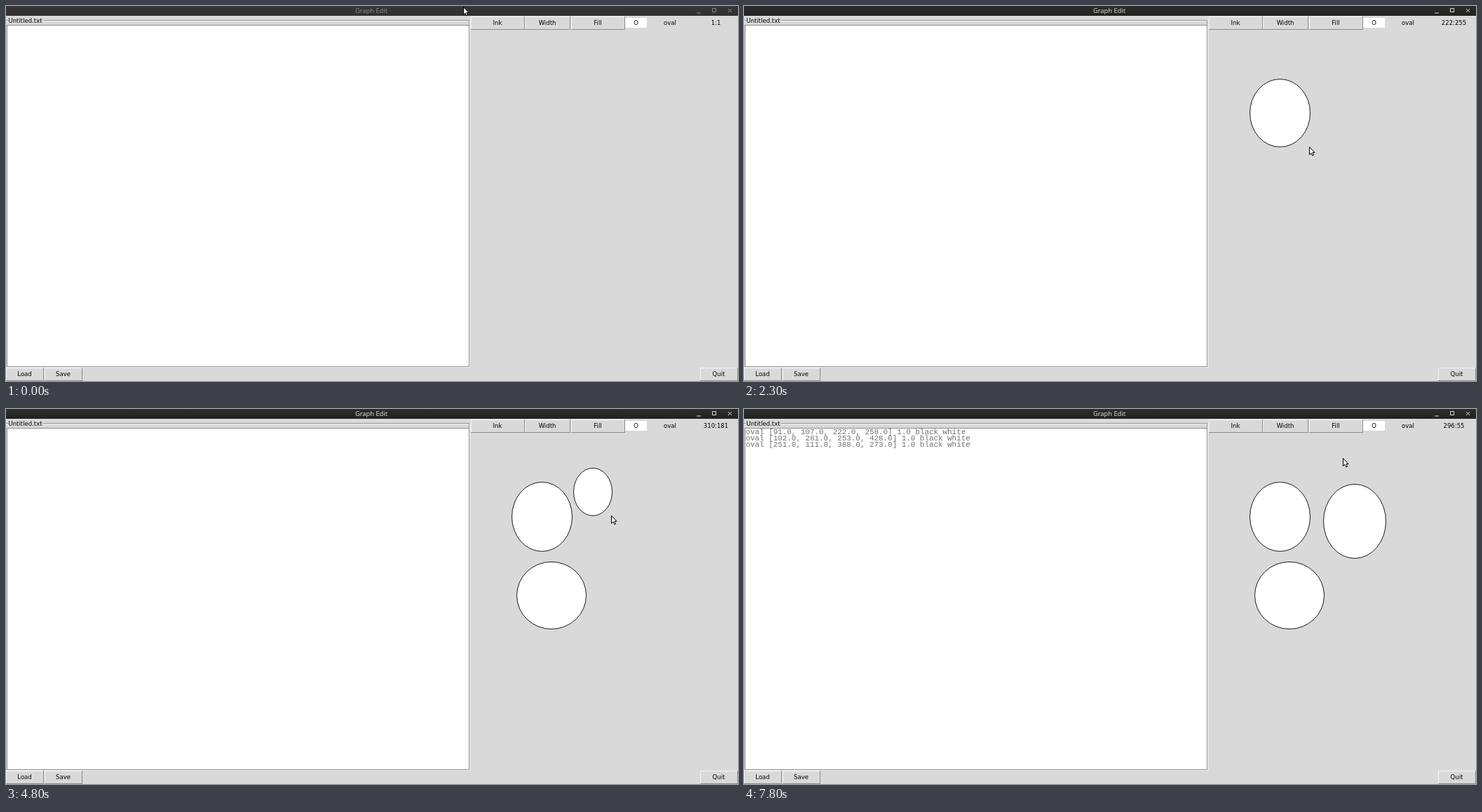
Write an HTML page with a canvas that moves like this. It is 1044 px wide and 536 px high and loops after 8 s.

```html
<!DOCTYPE html>
<html lang="en">
<head>
<meta charset="utf-8">
<title>Graph Edit</title>
<style>
html, body { margin: 0; width: 100%; height: 100%; overflow: hidden; background: #d9d9d9; }
canvas { display: block; }
</style>
</head>
<body>
<canvas id="stage" width="1044" height="536"></canvas>
<script>
const ctx = document.getElementById('stage').getContext('2d');
const LOOP = 8000, FOCUS = 1500, DROP = 5900, SAVED = 7600;
const UI = '8.5px "DejaVu Sans", sans-serif';
const TITLE = '9.3px "Noto Sans", "Open Sans", sans-serif';
const MONO = '10.9px "Liberation Mono", monospace';
const ARROW = new Path2D('M0 0V11L2.5 8.7L4.2 12.4L6 11.6L4.4 8H7.5Z');

// Drawing units to the centre of a stage pixel
const sx = x => Math.floor(662 + x * 0.6545) + 0.5;
const sy = y => Math.floor(34.5 + y * 0.6545) + 0.5;

// Each oval follows the pointer from press to release
const OVALS = [
  { box: [91, 107, 222, 258], press: 1500, release: 2400 },
  { box: [102, 281, 253, 428], press: 3000, release: 3900 },
  { box: [226, 77, 363, 239], press: 4400, release: 5100, shift: [25, 34] }
];

// Turning points of the pointer: time, x, y
const PATH = [
  [400, -13, -50], [1300, 98, 140], [1500, 91, 107], [1900, 165, 191],
  [2300, 222, 255], [2500, 150, 271], [2800, 102, 281], [3000, 104, 280],
  [3600, 250, 422], [4200, 222, 98], [4400, 226, 77], [4800, 310, 181],
  [5100, 363, 239], [5600, 297, 179], [5900, 322, 213], [6200, 308, 59],
  [6700, 296, 55], [LOOP, 296, 55]
];

function pointerAt(t) {
  const i = PATH.findIndex(p => p[0] > t);
  if (i < 1) return PATH[0].slice(1);
  const [t0, ...from] = PATH[i - 1], [t1, ...to] = PATH[i];
  const step = t < 2500 ? 100 : 300;
  const k = Math.floor((t - t0) / step) * step / (t1 - t0);
  return from.map((a, n) => Math.round(a + (to[n] - a) * k));
}

function boxAt({ box, press, release, shift }, t, pointer) {
  if (t < press) return null;
  if (t < release) return [box[0], box[1], ...pointer];
  return shift && t >= DROP ? box.map((v, n) => v + shift[n % 2]) : box;
}

function rect(x, y, w, h, color) {
  ctx.fillStyle = color;
  ctx.fillRect(x, y, w, h);
}

function text(str, x, y, font = UI, color = '#000', align = 'center') {
  ctx.font = font;
  ctx.fillStyle = color;
  ctx.textAlign = align;
  ctx.fillText(str, x, y);
}

function button(label, x, y, w) {
  rect(x, y, w, 19, '#8c8c8c');
  rect(x, y, w - 1, 18, '#f4f4f4');
  rect(x + 1, y + 1, w - 2, 17, '#d9d9d9');
  text(label, x + w / 2 - 0.5, y + 12);
}

function titleBar(focused) {
  const shade = ctx.createLinearGradient(0, 0, 0, 14);
  shade.addColorStop(0, focused ? '#2d2d2d' : '#373737');
  shade.addColorStop(1, focused ? '#212121' : '#303030');
  rect(0, 0, 1044, 14, shade);
  const ink = focused ? '#dfdbd2' : '#8a8a8a';
  text('Graph Edit', 521, 10.3, TITLE, ink);
  ctx.strokeStyle = ink;
  ctx.lineWidth = 1;
  ctx.beginPath();
  ctx.moveTo(985, 10); ctx.lineTo(991, 10);
  ctx.rect(1007.5, 3.5, 5, 5);
  ctx.moveTo(1030, 4); ctx.lineTo(1035, 9);
  ctx.moveTo(1035, 4); ctx.lineTo(1030, 9);
  ctx.stroke();
}

function chrome() {
  rect(0, 14, 1044, 522, '#d9d9d9');
  rect(0, 20, 661, 1, '#929292');
  rect(0, 21, 661, 1, '#f4f4f4');
  rect(3, 18, 50, 6, '#d9d9d9');
  text('Untitled.txt', 3.5, 23.5, UI, '#000', 'left');
  rect(660, 20, 1, 8, '#929292');
  rect(1, 27, 660, 489, '#8c8c8c');
  rect(2, 28, 658, 487, '#fff');
  rect(661, 20, 1, 497, '#f4f4f4');
  rect(0, 516, 662, 1, '#f4f4f4');
  button('Ink', 663, 15, 77);
  button('Width', 740, 15, 65);
  button('Fill', 806, 15, 77);
  rect(883, 17, 31, 14, '#fff');
  text('O', 898.5, 27);
  text('oval', 947, 27);
  button('Load', 0, 517, 54);
  button('Save', 55, 517, 54);
  button('Quit', 990, 517, 54);
}

function oval([x0, y0, x1, y1]) {
  if (x1 <= x0 || y1 <= y0) return;
  const l = sx(x0), t = sy(y0), r = sx(x1), b = sy(y1);
  ctx.beginPath();
  ctx.ellipse((l + r) / 2, (t + b) / 2, (r - l) / 2, (b - t) / 2, 0, 0, 2 * Math.PI);
  ctx.fillStyle = '#fff';
  ctx.fill();
  ctx.strokeStyle = '#000';
  ctx.lineWidth = 0.9;
  ctx.stroke();
}

function arrow(x, y) {
  ctx.save();
  ctx.translate(x, y);
  ctx.fillStyle = '#f2f2f2';
  ctx.strokeStyle = '#000';
  ctx.lineWidth = 1;
  ctx.fill(ARROW);
  ctx.stroke(ARROW);
  ctx.restore();
}

function fileLine(box, row) {
  const coords = box.map(v => v.toFixed(1)).join(', ');
  text(`oval [${coords}] 1.0 black white`, 2.5, 36 + row * 9, MONO, '#707070', 'left');
}

function draw(t) {
  const pointer = pointerAt(t);
  const boxes = OVALS.map(o => boxAt(o, t, pointer)).filter(Boolean);
  chrome();
  titleBar(t >= FOCUS);
  text(pointer.map(v => Math.max(1, v)).join(':'), 1012.5, 27);
  boxes.forEach(oval);
  if (t >= SAVED) boxes.forEach(fileLine);
  arrow(sx(pointer[0]) - 1, sy(pointer[1]));
}

const start = performance.now();
function frame() {
  draw((performance.now() - start) % LOOP);
  requestAnimationFrame(frame);
}
frame();
</script>
</body>
</html>
```
